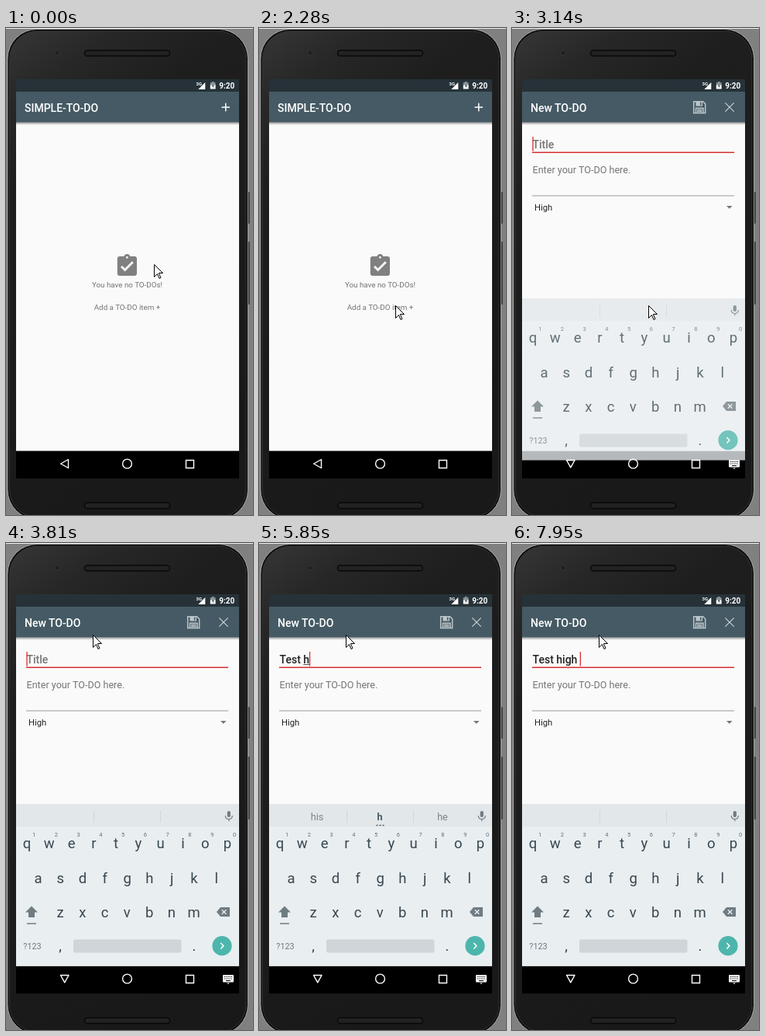
Recreate the animation shown at these times as an HTML page. Size 319 by 627 pixels, loop 8000 ms.

```html
<!DOCTYPE html>
<html lang="en">
<head>
<meta charset="utf-8">
<title>To-do demo</title>
<style>
html, body { margin: 0; width: 100%; height: 100%; overflow: hidden; background: #808080; }
svg { display: block; font-family: Roboto, sans-serif; }
text { white-space: pre; }
.mid { text-anchor: middle; }
.bar { font-size: 14px; font-weight: 500; fill: #fff; }
.key { font-size: 18.5px; fill: #37474f; text-anchor: middle; }
.digit { font-size: 7.5px; fill: #607078; text-anchor: middle; }
.word { font-size: 12.6px; fill: #78868c; text-anchor: middle; }
.main { font-weight: 700; fill: #455a64; }
.empty { font-size: 9.8px; fill: #737373; text-anchor: middle; }
</style>
</head>
<body>
<svg width="319" height="627" viewBox="0 0 319 627">
  <defs>
    <linearGradient id="body" x2=".35" y2="1">
      <stop stop-color="#363636"/><stop offset=".14" stop-color="#272727"/>
      <stop offset=".3" stop-color="#1e1e1e"/><stop offset="1" stop-color="#191919"/>
    </linearGradient>
    <linearGradient id="shade" x2="0" y2="1">
      <stop stop-opacity=".38"/><stop offset="1" stop-opacity="0"/>
    </linearGradient>
    <clipPath id="screen"><path d="M13 66h288v514H13z"/></clipPath>
    <g id="page">
      <path fill="#fafafa" d="M13 121h288v423.500H13z"/>
      <path fill="#263238" d="M13 66h288v16H13z"/>
      <path fill="#455a64" d="M13 82h288v39.500H13z"/>
      <path fill="url(#shade)" d="M13 121.500h288v3.500H13z"/>
    </g>
  </defs>

  <!-- phone -->
  <path fill="#f0f0f0" d="M0 0h319v1H0z"/>
  <rect x="311" y="211" width="3.500" height="41" rx="1" fill="#2a2a2a"/>
  <rect x="311" y="275" width="3.500" height="81" rx="1" fill="#2a2a2a"/>
  <rect x="2" y="1.500" width="310.500" height="631" rx="38" fill="#0c0c0c" stroke="#b0b0b0" stroke-width=".9"/>
  <rect x="4.500" y="4" width="305.500" height="626" rx="36" fill="url(#body)" stroke="#3c3c3c" stroke-width=".8"/>
  <circle cx="66" cy="32" r="3" fill="#1f1f1f" stroke="#383838" stroke-width=".8"/>
  <g fill="#222" stroke="#080808" stroke-width="1.500">
    <rect x="101.500" y="28.800" width="110" height="7.200" rx="3.600"/>
    <rect x="101.500" y="611.300" width="110" height="7.200" rx="3.600"/>
  </g>

  <g clip-path="url(#screen)">
    <path d="M13 66h288v514H13z"/>

    <!-- empty list -->
    <g id="list">
      <use href="#page"/>
      <text class="bar" x="24" y="107.500">SIMPLE-TO-DO</text>
      <path d="M278.500 102h10.500M283.750 96.750v10.500" stroke="#fff" stroke-width="1.500"/>
      <path transform="translate(139.600 289.700) scale(1.400)" fill="#808080" d="M19 3h-4.180C14.400 1.840 13.300 1 12 1c-1.300 0-2.400.84-2.820 2H5c-1.100 0-2 .9-2 2v14c0 1.100.9 2 2 2h14c1.100 0 2-.9 2-2V5c0-1.100-.9-2-2-2zm-7 0c.55 0 1 .45 1 1s-.45 1-1 1-1-.45-1-1 .45-1 1-1zm-2 14l-4-4 1.410-1.410L10 14.170l6.590-6.590L18 9l-8 8z"/>
      <text class="empty" x="156.500" y="333.700">You have no TO-DOs!</text>
      <text class="empty" x="156.500" y="362.700">Add a TO-DO item +</text>
    </g>

    <!-- edit form -->
    <g id="form">
      <use href="#page"/>
      <text class="bar" x="24" y="107.500">New TO-DO</text>
      <g fill="none" stroke="#bcc5c9" stroke-width="1.500">
        <path d="M234.700 94.700h12l3 3v11.800h-15zM237.500 109v-5.700h9.500v5.700M239 105.500h6.500M239 107.500h6.500"/>
        <path d="M237.500 95h8.500v5.500h-8.500z" fill="#bcc5c9" stroke="none"/>
        <path d="M243.700 95.500v4" stroke="#455a64" stroke-width="1.600"/>
        <path d="M275.300 96.300l11.400 11.400m0-11.400l-11.400 11.400" stroke="#d0d6d9" stroke-width="1.100"/>
      </g>
      <text id="title" x="26.500" y="154.500" font-size="14" font-weight="500"></text>
      <path id="under" stroke="#555" stroke-width="1"/>
      <path d="M26 160.300h261" stroke="#d92f2f" stroke-width="1.500"/>
      <path id="caret" d="M0 140v18.500" stroke="#dd3a3a" stroke-width="1.400"/>
      <text x="26.500" y="186.500" font-size="12.600" fill="#757575">Enter your TO-DO here.</text>
      <path d="M26 216h261" stroke="#9a9a9a"/>
      <text x="29" y="235" font-size="11.200" fill="#212121">High</text>
      <path d="M277 229h7.500l-3.750 3.750z" fill="#757575"/>
    </g>

    <!-- keyboard -->
    <g id="keyboard">
      <path fill="#e9eef1" d="M13 336h288v208.500H13z"/>
      <path fill="#e2e7ea" d="M13 336h288v29H13z"/>
      <path d="M113.500 344v16M199.500 344v16" stroke="#d0d6d9"/>
      <g fill="#6f7c82">
        <rect x="285.700" y="345" width="4.200" height="8" rx="2.100"/>
        <path d="M283.300 351q0 4.500 4.500 4.500t4.500-4.500M287.800 355.500v2.700" fill="none" stroke="#6f7c82" stroke-width="1.200"/>
        <path d="M33 467.500l8 8h-4v6.500h-8v-6.500h-4zM27 489.300h12v1.400H27z"/>
        <path d="M277 469h12v12h-12l-5-6z"/>
      </g>
      <path d="M278.800 472.200l5.600 5.600m0-5.600l-5.600 5.600" stroke="#e9eef1" stroke-width="1.300"/>
      <text class="mid" x="34" y="522.500" font-size="10.800" fill="#6a7a82">?123</text>
      <rect x="87" y="510.500" width="139.500" height="17" rx="2" fill="#cfd5d8"/>
      <circle cx="279" cy="518.700" r="12.600" fill="#4db6ac"/>
      <path d="M277.300 515l3.600 3.700-3.600 3.700" fill="none" stroke="#fff" stroke-width="1.500"/>
      <text class="word" x="75" y="356.500"></text>
      <text class="word main" x="156" y="356.500"></text>
      <text class="word" x="237" y="356.500"></text>
      <path id="dots" d="M151.500 363.500h2m2 0h2m2 0h2" stroke="#455a64" stroke-width="1.700"/>
    </g>

    <!-- system bars -->
    <g fill="#fff">
      <text x="275.300" y="78" font-size="10" font-weight="700">9:20</text>
      <path d="M265.800 69h2.800v1.300h2v3.700h-6.800v-3.700h2z" fill="#87949a"/>
      <path d="M263.800 73.500h6.800v5h-6.800z"/>
      <path d="M267.800 72l-2 3h1.500l-.5 2.500 2-3.200h-1.500z" fill="#263238"/>
      <path d="M257.300 70v9h-9z"/>
      <text x="245.500" y="73.800" font-size="6" font-weight="700">3G</text>
    </g>
    <g fill="none" stroke="#fff" stroke-width="1.400" stroke-linejoin="round">
      <path id="back"/>
      <circle cx="156.500" cy="561" r="5.900"/>
      <path d="M232.500 556.500h10v10h-10z" stroke-linejoin="miter"/>
    </g>
    <g id="switcher">
      <rect x="280" y="556" width="14" height="9.500" rx="1" fill="#fff"/>
      <path d="M282 558.500h10.500M282 561h10.500" stroke="#000" stroke-width="1.200" stroke-dasharray="1.200 1"/>
      <path d="M284 563.500h6" stroke="#000"/>
      <path d="M285.200 566.500h3.600l-1.800 1.600z" fill="#fff"/>
    </g>
  </g>

  <path id="pointer" d="M.5.5v16l4-4 2.500 6 2-1-2.500-5.500v-.5h5z" fill="#fff" stroke="#000" stroke-linejoin="round"/>
</svg>

<script>
const LOOP = 8000;
const $ = id => document.getElementById(id);
const words = document.querySelectorAll('.word');

function addKeys(letters, x, y, cls = 'key', step = 28.78) {
  [...letters].forEach((char, i) => {
    const key = document.createElementNS('http://www.w3.org/2000/svg', 'text');
    key.setAttribute('class', cls);
    key.setAttribute('x', x + i * step);
    key.setAttribute('y', y);
    key.textContent = char;
    $('keyboard').append(key);
  });
}
addKeys('qwertyuiop', 27, 393);
addKeys('1234567890', 36, 378, 'digit');
addKeys('asdfghjkl', 41.5, 437.5);
addKeys('zxcvbnm', 70, 481.5);
addKeys(',.', 70, 525, 'key', 173);

// Each track is a list of [start time, values...]; a value holds until the next start.
const pointerTrack = [
  [0, 191, 304], [430, 189, 310], [552, 184, 328], [675, 177, 351], [797, 170, 370], [920, 166, 381],
  [1070, 180, 238], [1230, 204, 151], [1380, 221, 323],
  [1520, 231, 368], [1643, 222, 400], [1767, 199, 408], [1890, 179, 372],
  [2040, 178, 367], [2160, 177, 361], [2280, 176, 357],
  [3260, 158, 262], [3380, 122, 140], [3500, 112, 118]
];
// Layers: vertical offset and opacity.
const listTrack = [[0, 0, 1], [2860, 0, .9]];
const formTrack = [[0, 0, 0], [2860, 14, .78], [2990, 1, .97], [3140, 0, 1]];
const keyboardTrack = [[0, 0, 0], [3140, 12, .78], [3260, 1, .97], [3380, 0, 1]];
const textTrack = [
  [0, ''], [4210, 'T'], [4520, 'Te'], [4670, 'Tes'], [4930, 'Test'], [5170, 'Test '],
  [5700, 'Test h'], [6845, 'Test hi'], [7390, 'Test hig'], [7670, 'Test high ']
];
const wordTrack = [
  [0, '', '', ''], [4360, 'The', 'T', 'To'], [4670, 'The', 'Te', 'Test'], [4790, 'Yes', 'Tes', 'Tests'],
  [5050, 'Tests', 'Test', 'Testing'], [5420, '', '', ''],
  [5850, 'his', 'h', 'he'], [7110, 'his', 'hi', 'hit'], [7520, 'big', 'hig', 'high'],
  [7670, 'higher', 'high', 'highest'], [7950, '', '', '']
];
const caretTrack = [[0, 1], [3380, 0], [3810, 1], [6260, 0], [6720, 1]];
const underTrack = [[0, 0], [4360, 1], [5170, 0], [5850, 1], [7670, 0]];

const at = (track, t) => track.findLast(entry => entry[0] <= t).slice(1);
const show = (node, on) => node.setAttribute('visibility', on ? 'visible' : 'hidden');

function place(id, [offset, opacity]) {
  $(id).setAttribute('transform', `translate(0 ${offset})`);
  $(id).setAttribute('opacity', opacity);
}

function draw(now) {
  const t = now % LOOP;
  place('list', at(listTrack, t));
  place('form', at(formTrack, t));
  place('keyboard', at(keyboardTrack, t));
  $('pointer').setAttribute('transform', `translate(${at(pointerTrack, t)})`);

  const [text] = at(textTrack, t);
  const title = $('title');
  title.textContent = text || 'Title';
  title.setAttribute('fill', text ? '#212121' : '#757575');
  const xAt = n => 26.5 + (n ? title.getSubStringLength(0, n) : 0);
  const end = xAt(text.length);
  $('caret').setAttribute('transform', `translate(${end + .5} 0)`);
  show($('caret'), at(caretTrack, t)[0]);
  $('under').setAttribute('d', `M${xAt(text.lastIndexOf(' ') + 1)} 156.500H${end}`);
  show($('under'), at(underTrack, t)[0]);

  const suggestions = at(wordTrack, t);
  words.forEach((node, i) => { node.textContent = suggestions[i]; });
  show($('dots'), suggestions[1]);

  const typing = t >= 2990;
  $('back').setAttribute('d', typing ? 'M70.500 556.500h10.500l-5.250 9.300z' : 'M70.700 561l9.800-5.500v11z');
  show($('switcher'), typing);
}

const start = performance.now();
function tick() {
  draw(performance.now() - start);
  requestAnimationFrame(tick);
}
tick();
</script>
</body>
</html>
```
